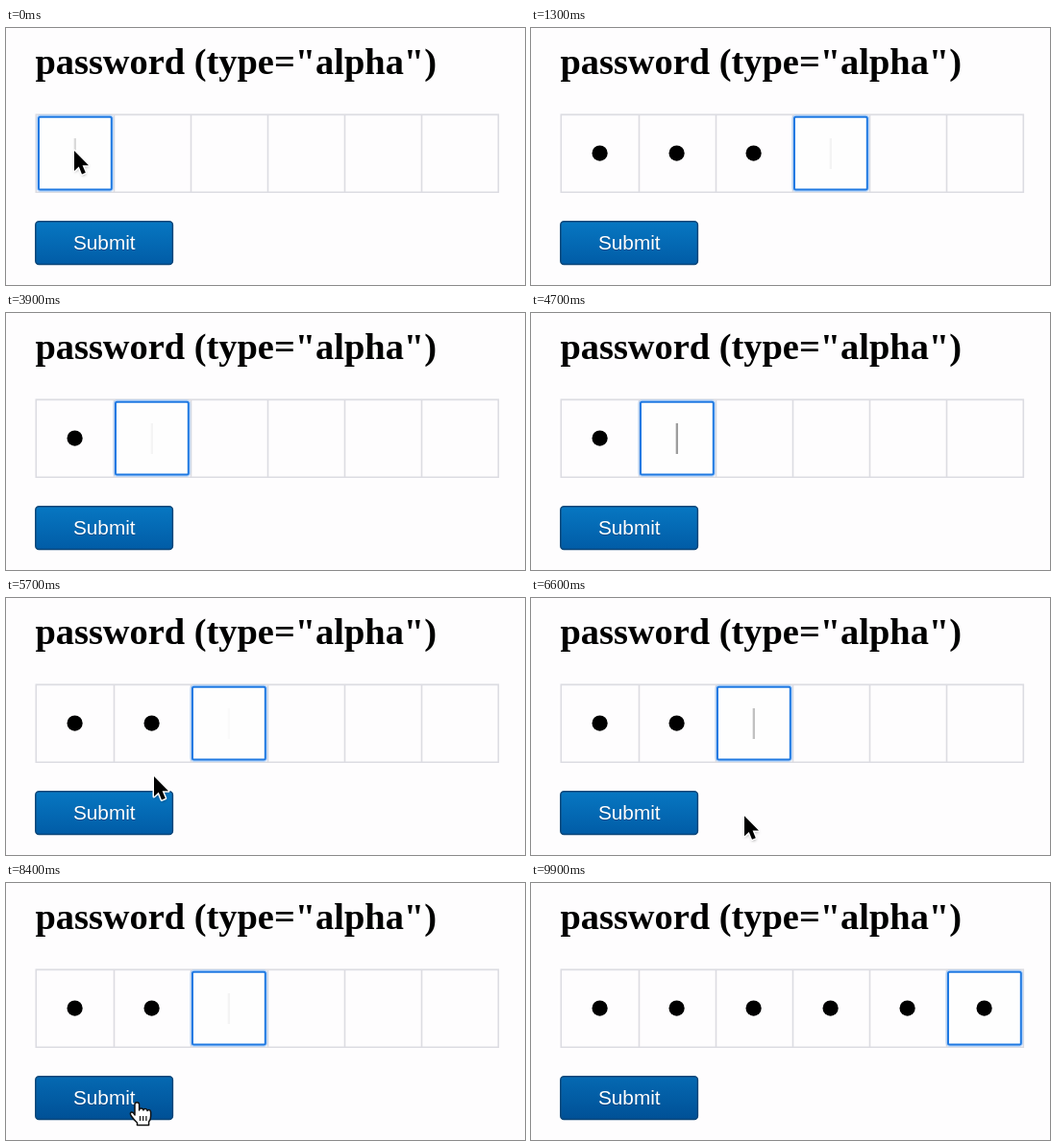
An HTML page for the animation above (10 s loop, 540x268 px).

```html
<!DOCTYPE html>
<html lang="en">
<head>
<meta charset="utf-8">
<title>Password input</title>
<style>
  html, body { margin: 0; width: 100%; height: 100%; overflow: hidden; background: #fefdfe; }
  svg { display: block; width: 540px; height: 268px; }
  .title { font: bold 38.4px "Liberation Serif", Times, serif; }
  .label { font: 20.8px "Liberation Sans", Arial, sans-serif; fill: #fff; text-anchor: middle; }
  .shade { fill: #003a70; opacity: .6; }
  .grid { fill: none; stroke: #dcdce2; stroke-width: 1.6; }
</style>
</head>
<body>
<svg viewBox="0 0 540 268">
  <defs>
    <linearGradient id="idle" x2="0" y2="1">
      <stop stop-color="#0777c2"/><stop offset="1" stop-color="#015ca6"/>
    </linearGradient>
    <linearGradient id="hover" x2="0" y2="1">
      <stop stop-color="#0569b2"/><stop offset="1" stop-color="#005096"/>
    </linearGradient>
    <filter id="soft" x="-20%" y="-30%" width="140%" height="160%"><feGaussianBlur stdDeviation="1.6"/></filter>
  </defs>
  <text class="title" x="30.4" y="48">password (type="alpha")</text>
  <path class="grid" id="grid"/>
  <g id="ring" fill="none">
    <rect x="33" y="91.8" width="77.6" height="77.6" rx="3" stroke="#9cc6fa" stroke-width="3.2" opacity=".6"/>
    <rect x="34" y="92.8" width="75.8" height="75.8" rx="1.5" fill="#fefefe" stroke="#1f79e2" stroke-width="2"/>
  </g>
  <g id="dots"></g>
  <rect id="caret" x="70.7" y="115" width="2.3" height="32" fill="#858585"/>
  <rect id="glow" x="28" y="199" width="148" height="50" rx="6" fill="#5ea4ee" filter="url(#soft)"/>
  <rect id="button" x="30.8" y="201.8" width="142.6" height="44.8" rx="3.5" stroke="#0a4679" stroke-width="1.5"/>
  <text class="label shade" x="102.3" y="232.3">Submit</text>
  <text class="label" x="102.3" y="231">Submit</text>
  <g id="arrow" stroke-linejoin="round">
    <path d="M0 0V21L4.8 16.6 8 24.4 11.8 22.8 8.6 15.2H15Z" transform="translate(.6 2)" fill="#000" opacity=".35" filter="url(#soft)"/>
    <path d="M0 0V21L4.8 16.6 8 24.4 11.8 22.8 8.6 15.2H15Z" stroke="#fff" stroke-width="3"/>
    <path d="M0 0V21L4.8 16.6 8 24.4 11.8 22.8 8.6 15.2H15Z"/>
  </g>
  <g id="hand" fill="#fff" stroke="#111" stroke-width="1.5" stroke-linejoin="round">
    <path d="M6 15V4a2.3 2.3 0 0 1 4.6 0V10q0-2 2-2t2.3 2q.2-1.5 2-1.5t2.2 2q.3-1 1.7-1t1.8 2.3V16q0 4-2 6V25.5H8.5V23Q5 20 2 15.5Q.6 12.6 2.5 12T6 15Z"/>
    <path d="M11.5 16v5M14.7 16v5M17.9 16v5" stroke-width="1.2"/>
  </g>
</svg>
<script>
  const LOOP = 10000, STEP = 100, CELL = 80;
  const el = id => document.getElementById(id);
  const show = (node, on) => { node.style.display = on ? "" : "none"; };
  const move = (node, x, y) => node.setAttribute("transform", `translate(${x} ${y})`);

  // [time, filled cells]; each entry also restarts the caret blink
  const entries = [
    [-700, 0], [400, 1], [900, 2], [1300, 3], [1700, 4], [2200, 5], [2700, 6],
    [3000, 5], [3200, 4], [3500, 3], [3700, 2], [3900, 1], [4100, 0],
    [4500, 1], [4900, 2], [7100, 2], [8400, 2],
    [8900, 3], [9200, 4], [9500, 5], [9800, 6]
  ];
  const presses = [[6900, 7100], [8200, 8400]];
  const blink = [.08, .4, .8, 1, 1, .8, .5, .3, .03, 0, 0];

  // [time, x, y] of the pointer
  const path = [
    [0, 71, 128], [5400, 71, 128], [5700, 154, 186], [5900, 205, 214], [6100, 235, 225],
    [6300, 260, 225], [6500, 252, 226], [6800, 162, 230], [7000, 155, 229],
    [7500, 155, 229], [8100, 128, 227], [8900, 128, 227]
  ];

  let outline = "M31.3 90.4H512.3V171.3H31.3Z";
  for (let i = 1; i < 6; i++) outline += `M${32.5 + CELL * i} 90.4V171.3`;
  el("grid").setAttribute("d", outline);

  const dots = Array.from({ length: 6 }, (_, i) => {
    const dot = document.createElementNS("http://www.w3.org/2000/svg", "circle");
    dot.setAttribute("cx", 71.6 + CELL * i);
    dot.setAttribute("cy", 130.6);
    dot.setAttribute("r", 8.1);
    return el("dots").appendChild(dot);
  });

  function pointerAt(t) {
    const next = path.findIndex(p => p[0] > t);
    if (next < 0) return path[path.length - 1].slice(1);
    const [t0, x0, y0] = path[next - 1], [t1, x1, y1] = path[next];
    const k = (t - t0) / (t1 - t0);
    return [x0 + (x1 - x0) * k, y0 + (y1 - y0) * k];
  }

  function draw(t) {
    const [since, filled] = entries.filter(e => e[0] <= t).pop();
    const pressed = presses.some(([a, b]) => t >= a && t < b);
    const focus = Math.min(filled, 5) * CELL;
    dots.forEach((dot, i) => show(dot, i < filled));

    move(el("ring"), focus, 0);
    show(el("ring"), !pressed);
    move(el("caret"), focus, 0);
    show(el("caret"), !pressed && filled < 6);
    el("caret").setAttribute("opacity", blink[Math.floor((t - since) / STEP) % blink.length]);

    const [x, y] = pointerAt(t);
    const over = t >= 6500 && x < 174;
    const visible = t < 400 || (t >= 5400 && t < 8900);
    move(el("arrow"), x, y);
    move(el("hand"), x, y);
    show(el("arrow"), visible && !over);
    show(el("hand"), visible && over);
    show(el("glow"), pressed);
    el("button").setAttribute("fill", over ? "url(#hover)" : "url(#idle)");
  }

  const start = performance.now();
  function tick() {
    const t = (performance.now() - start) % LOOP;
    draw(Math.floor(t / STEP) * STEP);
    requestAnimationFrame(tick);
  }
  tick();
</script>
</body>
</html>
```
